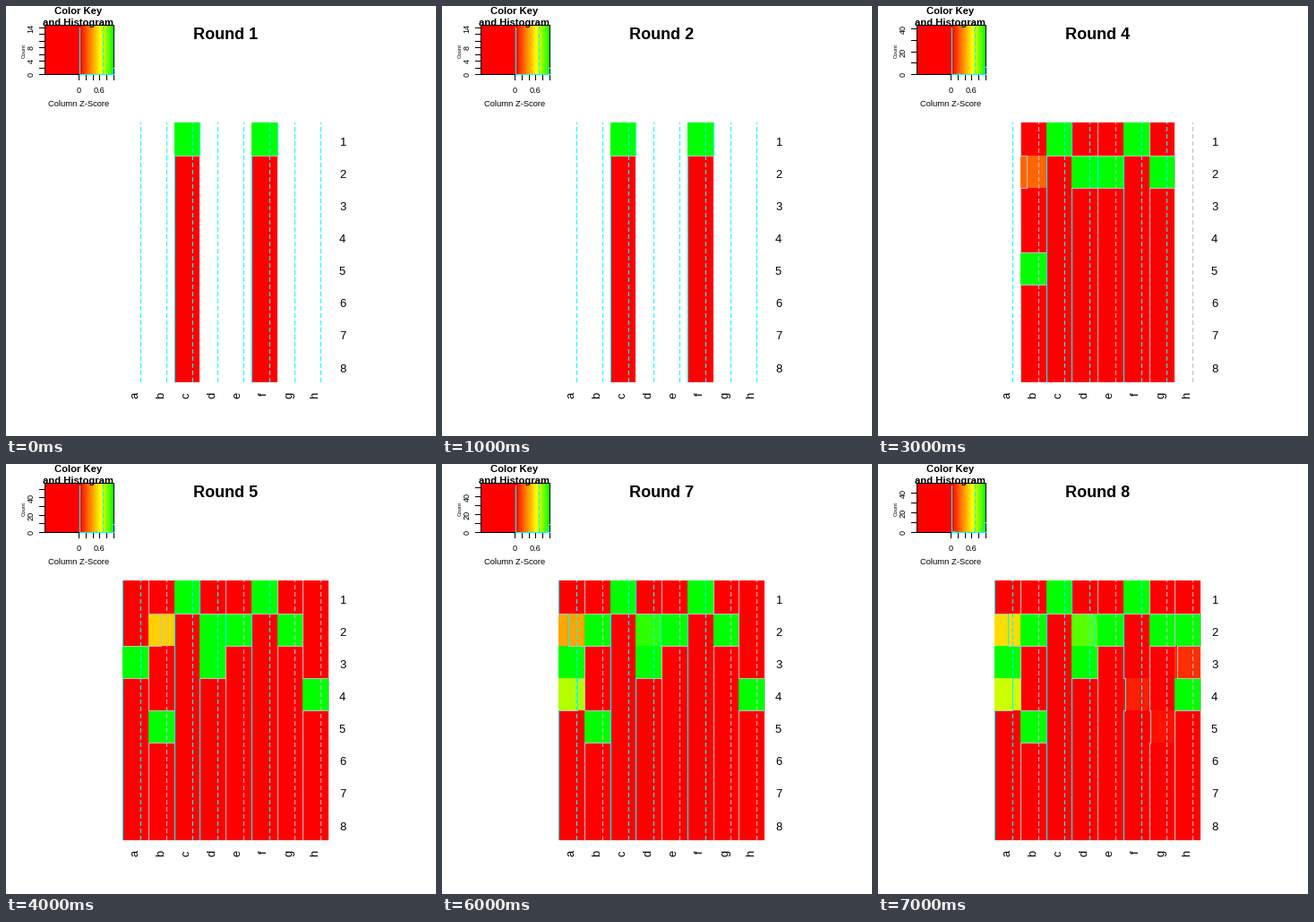
A matplotlib script for the animation above (8 s loop, 480x480 px).

```python
import matplotlib.pyplot as plt
from matplotlib.animation import FuncAnimation
from matplotlib.patches import Rectangle

SIZE, DPI, ROUNDS = 480, 100, 8
CYAN, GRAY = "#00ffff", "#bebebe"
COLS = "abcdefgh"
plt.rcParams["font.family"] = "Liberation Sans"

# Cells that take a new value in each round; the rest of a column is 0.
CHANGES = {
    1: {"c1": 1, "f1": 1},
    3: {"b2": 1, "b5": 1, "g2": 1},
    4: {"b2": .24, "d2": 1, "e2": 1},
    5: {"b2": .49, "a3": 1, "d3": 1, "h4": 1},
    6: {"b2": .72, "a4": .78, "d2": .97},
    7: {"b2": 1, "a2": .39, "d2": .93, "a4": .72},
    8: {"a2": .52, "d2": .86, "a4": .68, "h2": 1, "h3": .11,
        "f4": .07, "g5": .04},
}

fig = plt.figure(figsize=(SIZE / DPI, SIZE / DPI), dpi=DPI, facecolor="white")
ax = fig.add_axes([0, 0, 1, 1])


def block(x0, y0, x1, y1, color):
    """Fill pixels from (x0, y0) up to, not including, (x1, y1)."""
    ax.add_patch(Rectangle((x0, y0), x1 - x0, y1 - y0, facecolor=color,
                           linewidth=0, antialiased=False))


def hline(x0, x1, y, color):
    block(min(x0, x1), y, max(x0, x1) + 1, y + 1, color)


def vline(x, y0, y1, color):
    block(x, min(y0, y1), x + 1, max(y0, y1) + 1, color)


def dashes(x, top, bottom, color):
    for y in range(bottom, top, -8):
        block(x, max(top, y - 5), x + 1, y, color)


def label(x, y, s, px, ha="center", **kw):
    ax.text(x, y, s, fontsize=px * 72 / DPI, ha=ha, va="baseline",
            rotation_mode="anchor", **kw)


def ramp(v):
    """Red through yellow to green."""
    v = min(max(v, 0), 1)
    return (1, v / .6, 0) if v < .6 else ((1 - v) / .4, 1, 0)


def col_x(i):
    return int(130.5 + 28.75 * i)


def row_y(i):
    return int(130.9 + 36.2 * i)


def active_cols(n):
    if n < 3:
        return "cf"
    return {3: "bcfg", 4: "bcdefg"}.get(n, COLS)


def gray_dashes(n):
    if n < 3:
        return ""
    return {3: "bh", 4: "beh"}.get(n, "begh")


def values_at(n):
    cells = {}
    for k in range(1, n + 1):
        cells.update(CHANGES.get(k, {}))
    return {c: [cells.get(f"{c}{r}", 0) for r in range(1, 9)]
            for c in active_cols(n)}


def draw_trace(i, vals, color):
    xs = [int(130.5 + 28.75 * (i + v)) for v in vals]
    for r, x in enumerate(xs):
        if r and xs[r - 1] != x:
            hline(xs[r - 1], x, row_y(r), GRAY)
        vline(x, row_y(r), row_y(r + 1) - 1, color)


def draw_map(n, grid):
    for c, vals in grid.items():
        i = COLS.index(c)
        for r, v in enumerate(vals):
            block(col_x(i), row_y(r), col_x(i + 1), row_y(r + 1), ramp(v))
    for i, c in enumerate(COLS):
        dashes(int(150.55 + 28.73 * i), 130, 420,
               GRAY if c in gray_dashes(n) else CYAN)
        if c in grid:
            draw_trace(i, grid[c], GRAY if c in "begh" else CYAN)
        label(147 + 28.75 * i, 431, c, 13, ha="right", rotation=90)
        label(372, 155.5 + 36.15 * i, str(i + 1), 13, ha="left")


def draw_key(grid):
    flat = [v for vals in grid.values() for v in vals]
    peak = flat.count(0)
    height = lambda k: int(76.5 - 52.25 * k / peak)

    for x in range(43, 121):
        block(x, 22, x + 1, 77, ramp((x - 82) / 38))
    hline(43, 120, 21, "black")
    hline(43, 120, 76, "black")
    vline(43, 21, 76, "black")
    vline(120, 21, 76, "black")

    # Histogram outline
    dashes(108, 22, 76, CYAN)
    hline(82, 120, 76, CYAN)
    vline(82, 24, 76, CYAN)
    for v in sorted(set(flat) - {0}):
        x = int(81.5 + 38 * v)
        y = height(flat.count(v))
        vline(x, y, 76, CYAN)
        hline(x, min(x + 1, 120), y, CYAN)

    for k in range(6):
        vline(int(81.5 + 7.75 * k), 77, 82, "black")
    label(81, 97, "0", 9.2)
    label(104, 97, "0.6", 9.2)

    step = 2 if peak < 20 else 5 if peak < 30 else 10
    shown = (0, 4, 8, 14) if peak < 20 else (0, 10, 20) if peak < 30 \
        else (0, 20, 40)
    for k in range(0, peak + 1, step):
        hline(37, 43, height(k), "black")
        if k in shown:
            label(30.5, height(k) + .5, str(k), 9.2, rotation=90)

    label(81, 112, "Column Z-Score", 9.4)
    label(22, 49.5, "Count", 6, rotation=90)
    label(80.5, 9, "Color Key", 11.2, weight="bold")
    label(80.5, 22, "and Histogram", 11.2, weight="bold")


def update(i):
    n = i + 1
    ax.clear()
    ax.set_xlim(0, SIZE)
    ax.set_ylim(SIZE, 0)
    ax.axis("off")
    grid = values_at(n)
    draw_map(n, grid)
    draw_key(grid)
    label(245, 37, f"Round {n}", 18, weight="bold")
    return []


anim = FuncAnimation(fig, update, frames=ROUNDS, interval=1000,
                     init_func=lambda: [], repeat=True, repeat_delay=0)
plt.show()
```
